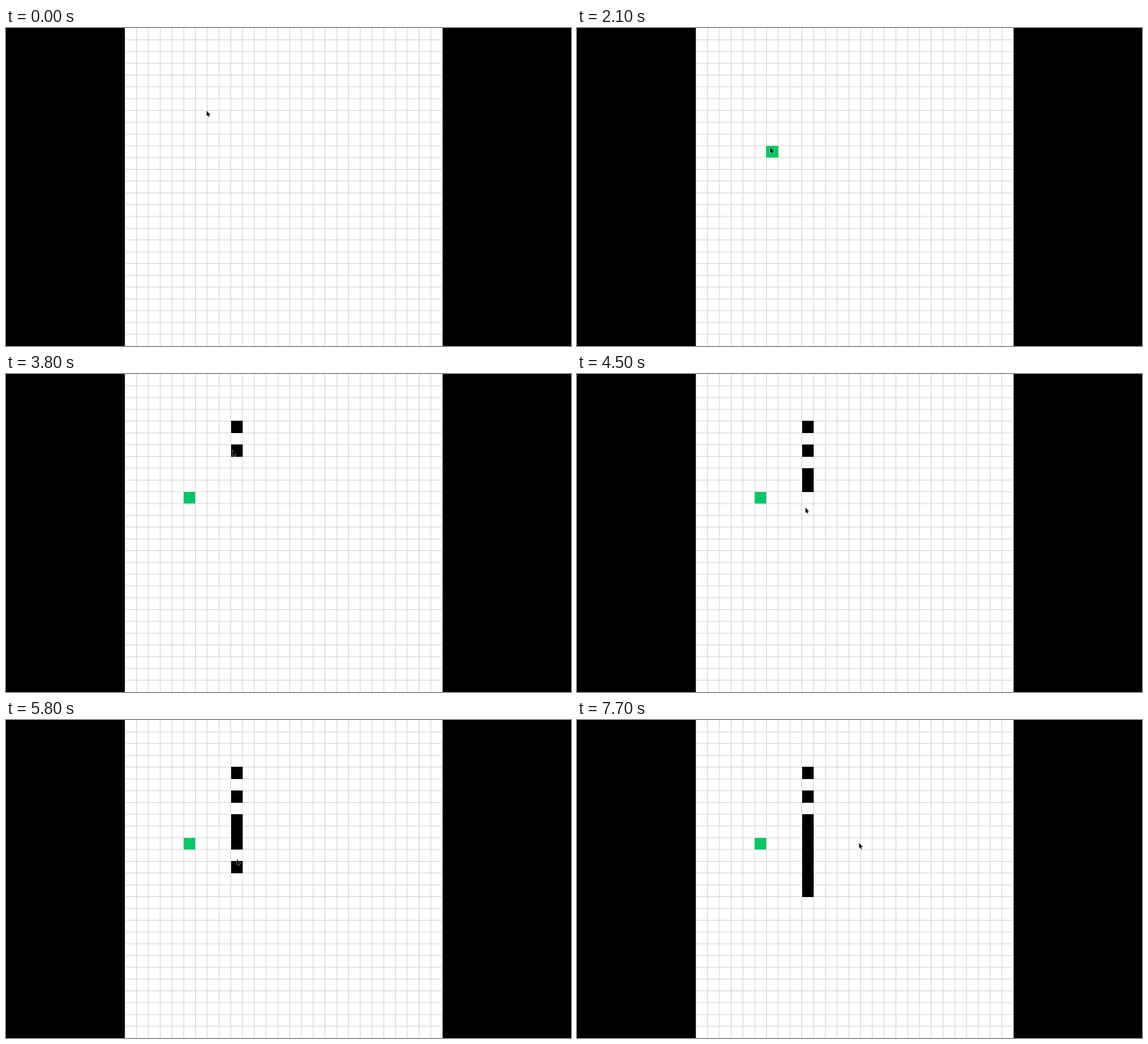
Write an HTML page with a canvas that moves like this. It is 690 by 388 pixels and loops after 8 s.

```html
<!DOCTYPE html>
<html lang="en">
<head>
<meta charset="utf-8">
<title>Grid drawing</title>
<style>
html, body { margin: 0; width: 100%; height: 100%; overflow: hidden; background: #000; }
canvas { display: block; }
</style>
</head>
<body>
<canvas id="stage" width="690" height="388"></canvas>
<script>
const ctx = document.getElementById("stage").getContext("2d");
const TICK = 100, LOOP = 80;
const LEFT = 145.2, SIZE = 388, COUNT = 27, CELL = SIZE / COUNT;
const GREEN = "#00c864", BLACK = "#000", LINE = "#dadada";

const moves = [];
const cells = [];
const arrow = new Path2D("M0 0V6.6L1.4 5.3L2.4 7.6L3.5 7.1L2.5 4.9H4.5Z");

// Positions are in cells; the pointer arrives at the end tick
function glide(end, ticks, col, row) {
  moves.push({ end, ticks, col, row });
}

function paint(col, row, color, from, until = LOOP) {
  cells.push({ col, row, color, from, until });
}

// Visits rows at an even pace, drifting right, and fills each on arrival
function sweep(rows, start, gap, col) {
  rows.forEach((row, i) => {
    const end = Math.round(start + i * gap);
    glide(end, Math.min(3, Math.floor(gap)), col + i * 0.1, row + 0.48);
    paint(Math.floor(col), row, BLACK, end);
  });
}

glide(0, 1, 6.95, 7.03);
glide(5, 2, 6.64, 7.65);
glide(13, 4, 6.14, 10.23);
paint(6, 10, GREEN, 16, 24);
glide(21, 2, 6.32, 10.16);
glide(27, 3, 5.34, 10.16);
paint(5, 10, GREEN, 27);
glide(34, 3, 9.03, 4.66);
sweep([4, 6, 8, 9], 36, 2.4, 9.05);
glide(45, 2, 9.31, 11.34);
glide(48, 3, 9.31, 12.1);
glide(51, 3, 9, 10.5);
sweep([10, 12, 11, 13, 14], 52, 3.4, 9.35);
glide(71, 4, 9.75, 15.38);
glide(75, 3, 13.83, 10.02);
glide(77, 1, 13.87, 10.44);

function pointerAt(tick) {
  let col = 0, row = 0;
  for (const move of moves) {
    const part = Math.min(1, Math.max(0, 1 - (move.end - tick) / move.ticks));
    col += (move.col - col) * part;
    row += (move.row - row) * part;
  }
  return [LEFT + col * CELL, row * CELL];
}

function drawGrid() {
  ctx.fillStyle = BLACK;
  ctx.fillRect(0, 0, 690, 388);
  ctx.fillStyle = "#fff";
  ctx.fillRect(LEFT, 0, SIZE, SIZE);
  ctx.fillStyle = LINE;
  for (let i = 1; i < COUNT; i++) {
    ctx.fillRect(LEFT + i * CELL - 0.5, 0, 1, SIZE);
    ctx.fillRect(LEFT, i * CELL - 0.5, SIZE, 1);
  }
}

function drawCell({ col, row, color }) {
  const x = Math.round(LEFT + col * CELL), y = Math.round(row * CELL);
  const right = Math.round(LEFT + (col + 1) * CELL), bottom = Math.round((row + 1) * CELL);
  ctx.fillStyle = color;
  ctx.fillRect(x, y, right - x, bottom - y);
}

function drawPointer([x, y]) {
  ctx.save();
  ctx.translate(x, y);
  ctx.strokeStyle = "rgba(255,255,255,.6)";
  ctx.stroke(arrow);
  ctx.fillStyle = BLACK;
  ctx.fill(arrow);
  ctx.restore();
}

function draw(tick) {
  drawGrid();
  cells.filter(cell => tick >= cell.from && tick < cell.until).forEach(drawCell);
  drawPointer(pointerAt(tick));
}

const begin = performance.now();
function frame() {
  draw(Math.floor((performance.now() - begin) / TICK) % LOOP);
  requestAnimationFrame(frame);
}
frame();
</script>
</body>
</html>
```
